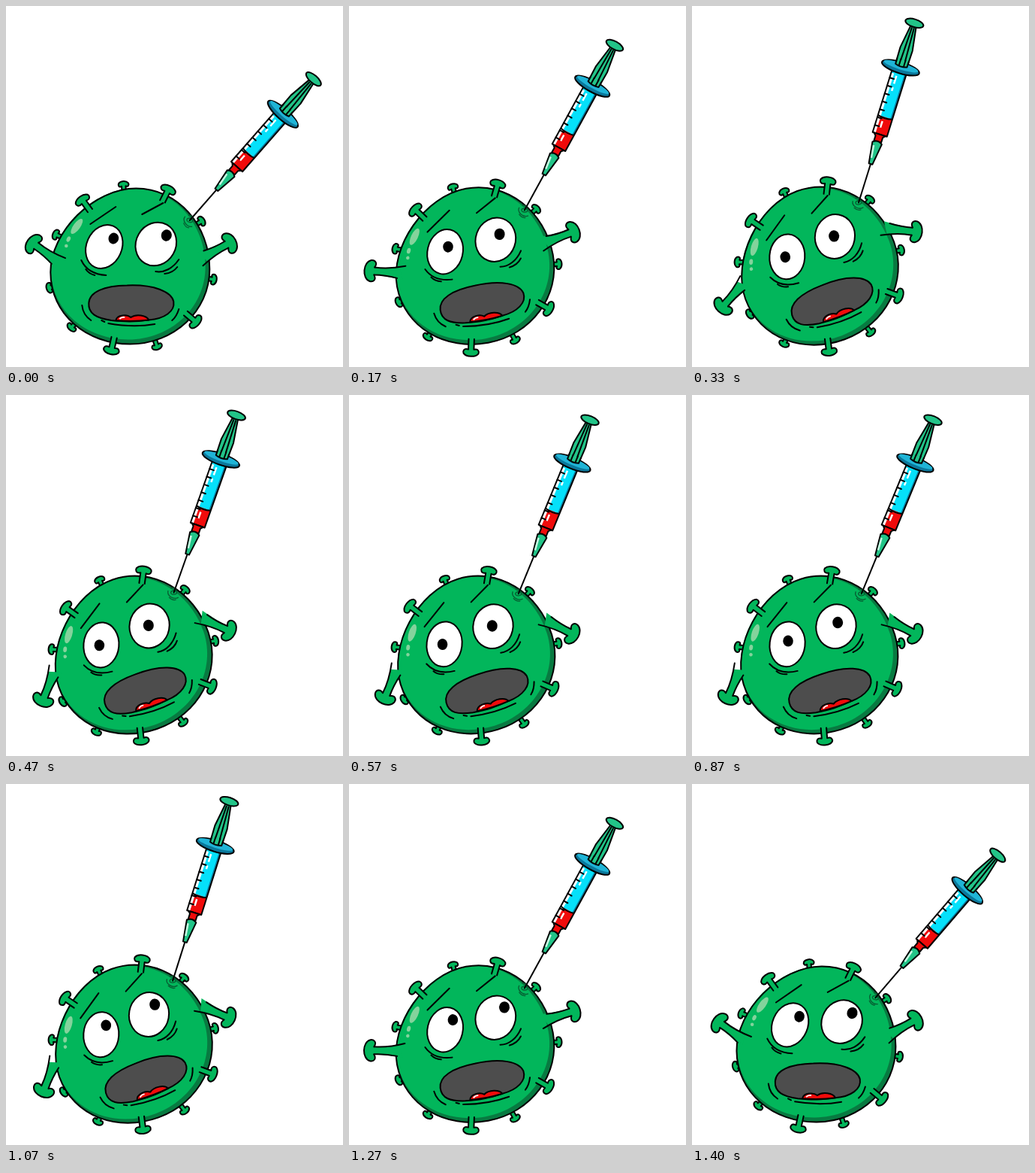
An HTML page for the animation above (1.43 s loop, 449 px wide and 480 px high).

```html
<!DOCTYPE html>
<html lang="en">
<head>
<meta charset="utf-8">
<title>Virus and syringe</title>
<style>
  html, body { margin: 0; width: 100%; height: 100%; overflow: hidden; background: #fff; }
  svg { display: block; width: 449px; height: 480px; }
  .ink { stroke: #000; stroke-width: 2; stroke-linecap: round; stroke-linejoin: round; }
  .line { fill: none; }
  .skin { fill: #02b65b; }
  .mint { fill: #22c488; }
</style>
</head>
<body>
<svg viewBox="0 0 449 480">
  <defs>
    <path id="ball" d="M106 4C106 60 58 103.500 0 103.500S-106 64-106 8C-106-46-48-103.500 8-103.500S106-54 106 4Z"/>
    <g id="arm">
      <path class="skin" d="M-4-5Q-20-5-44-9L-38 8Q-20 4-4 5Z"/>
      <path class="ink line" d="M-5-5Q-20-4-36-7M-5 5Q-24 4-46 10"/>
      <path class="ink skin" d="M-5-5C-9-11-5-15 0-14C11-11 11 11 0 14C-5 15-9 11-5 5"/>
    </g>
  </defs>
  <g id="virus">
    <g id="back"></g>
    <use href="#ball" fill="#087a41"/>
    <use href="#ball" class="skin" transform="translate(-2.500 -3) scale(.97)"/>
    <use href="#ball" class="ink line"/>
    <g id="front"></g>
    <use href="#arm" id="armL"/>
    <use href="#arm" id="armR"/>

    <g fill="#84d39c">
      <ellipse rx="4.500" ry="12" transform="translate(-71 -53) rotate(36)"/>
      <ellipse rx="2.500" ry="3.800" transform="translate(-82 -36) rotate(25)"/>
      <circle cx="-85" cy="-27" r="2.300"/>
    </g>

    <g class="ink" fill="#fff">
      <ellipse rx="23.500" ry="30" transform="translate(-34.500 -26) rotate(24)"/>
      <ellipse rx="26.500" ry="29.500" transform="translate(34.500 -29.500) rotate(30)"/>
    </g>
    <g id="pupils">
      <ellipse rx="6.800" ry="7.500" transform="translate(-37 -26.500) rotate(15)"/>
      <ellipse rx="7" ry="7.700" transform="translate(33.500 -30.500) rotate(15)"/>
    </g>

    <g class="ink line">
      <path d="M-53-56L-19-79M16-69L44-84"/>
      <path d="M-65-8C-59 5-48 11-32 12M-59 4Q-55 10-47 12"/>
      <path d="M34 7C45 9 57 3 65-9M46 10Q57 9 63 1"/>
      <path d="M-64 52C-63 62-58 68-52 72M65 57Q62 67 56 72"/>
      <path d="M-38 72L-34 74M-29 76Q4 82 33 77"/>
    </g>
    <path class="ink" fill="#4d4d4d" d="M-55 49C-54 34-35 26-4 25.500C32 24 55 34 58 47C60 60 46 70 25 71.500C5 74-5 74-25 72C-45 69-56 63-55 49Z"/>
    <path class="ink" fill="#f00b0b" d="M-19 72C-17 64-4 64 1 68C8 63 22 65 25 71.500Q4 74-19 72Z"/>
    <path d="M-14 70Q-11 67-7 68" stroke="#fff" stroke-width="1.800" fill="none"/>

    <g id="syringe">
      <g fill="none" stroke="#075c31" stroke-width="1.300">
        <ellipse rx="4" ry="2.500" transform="rotate(-25)"/>
        <path d="M-8 0C-8 7 3 10 8 4M-6-4Q-3-7 2-5M-4 8Q2 11 6 8"/>
      </g>
      <path class="ink" d="M0 0V-54"/>

      <path class="ink mint" d="M-8-188L-8.500-214L-3.500-247H3.500L8.500-214L8-188Z"/>
      <path class="ink line" d="M-3-192L-1.500-243M3.500-192L1.500-243"/>
      <ellipse class="ink mint" cy="-250" rx="12.500" ry="5.200"/>

      <path fill="#05e0fa" d="M-10-95H10V-188H-10Z"/>
      <path fill="#f00b0b" d="M-10-95H10V-119H-10Z"/>
      <path fill="#fff" d="M-10-95H-6V-178H-10Z"/>
      <path fill="#0b789b" d="M7.500-119H10V-186H7.500Z"/>
      <path d="M-2-165V-176M-2-155V-160M-2-104V-113" stroke="#fff" stroke-width="2.500"/>
      <path class="ink line" d="M-10-95H10V-186H-10ZM-10-119Q0-116 10-119"/>
      <path class="ink line" id="ticks"/>
      <ellipse class="ink" cy="-188" rx="26" ry="7.500" fill="#0b789b"/>
      <ellipse cy="-190" rx="24" ry="4.500" fill="#1fb4d6"/>
      <path class="mint" d="M-8-191V-198H8V-191Q0-188-8-191Z"/>
      <path class="ink line" d="M-8-198V-191Q0-188 8-191V-198M-3-191V-199M3.500-191V-199"/>

      <path class="ink" fill="#f00b0b" d="M-5-85V-92L-8-95H8L5-92V-85Z"/>
      <path class="ink mint" d="M-2.500-54L-6.500-83Q0-88 6.500-83L2.500-54Z"/>
      <path d="M-1.500-62L-3.500-79" stroke="#c8f7e2" stroke-width="2.500"/>
    </g>
  </g>
</svg>
<script>
const el = id => document.getElementById(id);
const FPS = 30, FRAMES = 43;

// A mushroom pointing along +x: cap at r, half width w, stem from root
function spike(angle, r, w, root) {
  const s = w * 0.27 + 1, neck = r - w * 0.42, top = r + w * 0.42 + 2;
  return `<path class="ink skin" transform="rotate(${angle})" d="M${root} ${-s}L${neck} ${-s}
    C${neck - 2} ${-w} ${r - 1} ${-w - 1} ${r + 1} ${-w}
    C${top} ${-w * 0.6} ${top} ${w * 0.6} ${r + 1} ${w}
    C${r - 1} ${w + 1} ${neck - 2} ${w} ${neck} ${s}L${root} ${s}"/>`;
}

// Spikes go round the ball, every other one big in each group of five;
// the ball is a little flat at the upper left.
for (let i = 0; i < 11; i++) {
  const angle = -157 + 31.2 * i + (i > 4 ? 10 : 0);
  const flat = 6 * Math.max(0, Math.cos((angle + 135) * Math.PI / 180)) ** 2;
  const big = i % 5 % 2;
  el(big ? 'front' : 'back').innerHTML += big
    ? spike(angle, 115 - flat, 10, 97 - flat)
    : spike(angle, 113 - flat, 6.5, 95);
}
el('ticks').setAttribute('d', Array.from({ length: 7 }, (_, i) => `M-10 ${-105 - i * 11}h6`).join(''));

const ease = u => (1 - Math.cos(Math.PI * Math.min(1, Math.max(0, u)))) / 2;

const place = (id, x, y, angle = 0, rest = '') =>
  el(id).setAttribute('transform', `translate(${x} ${y}) rotate(${angle}) ${rest}`);

function draw(k) {
  // The roll is the same forwards and backwards: tip over, ease off, tip again
  const m = Math.min(k, FRAMES - k);
  const tip = ease(m / 9.7), relax = ease((m - 9.7) / 11.8);
  const turn = -20 * tip + 4.2 * relax;
  const arms = ease(k / 15) - ease((k - 31) / 11);
  const look = 1 - ease(k / 10) + ease((k - 20) / 16);

  place('virus', 165.3 - turn * 0.14, 346, turn);
  place('syringe', 79.5, -61, 41.3 - 4 * tip + 3.3 * relax);
  place('armL', -104, -4.5, 225.6 - 86 * arms, 'translate(36) rotate(-9)');
  place('armR', 104, -10, -36 + 73 * arms, 'translate(36) rotate(8)');
  place('pupils', 15 * look, -10.5 * look);
}

const start = performance.now();
function tick() {
  const t = (performance.now() - start) % 1430;
  draw(Math.min(FRAMES - 1, Math.floor(t * FPS / 1000 + 0.1)));
  requestAnimationFrame(tick);
}
draw(0);
requestAnimationFrame(tick);
</script>
</body>
</html>
```
